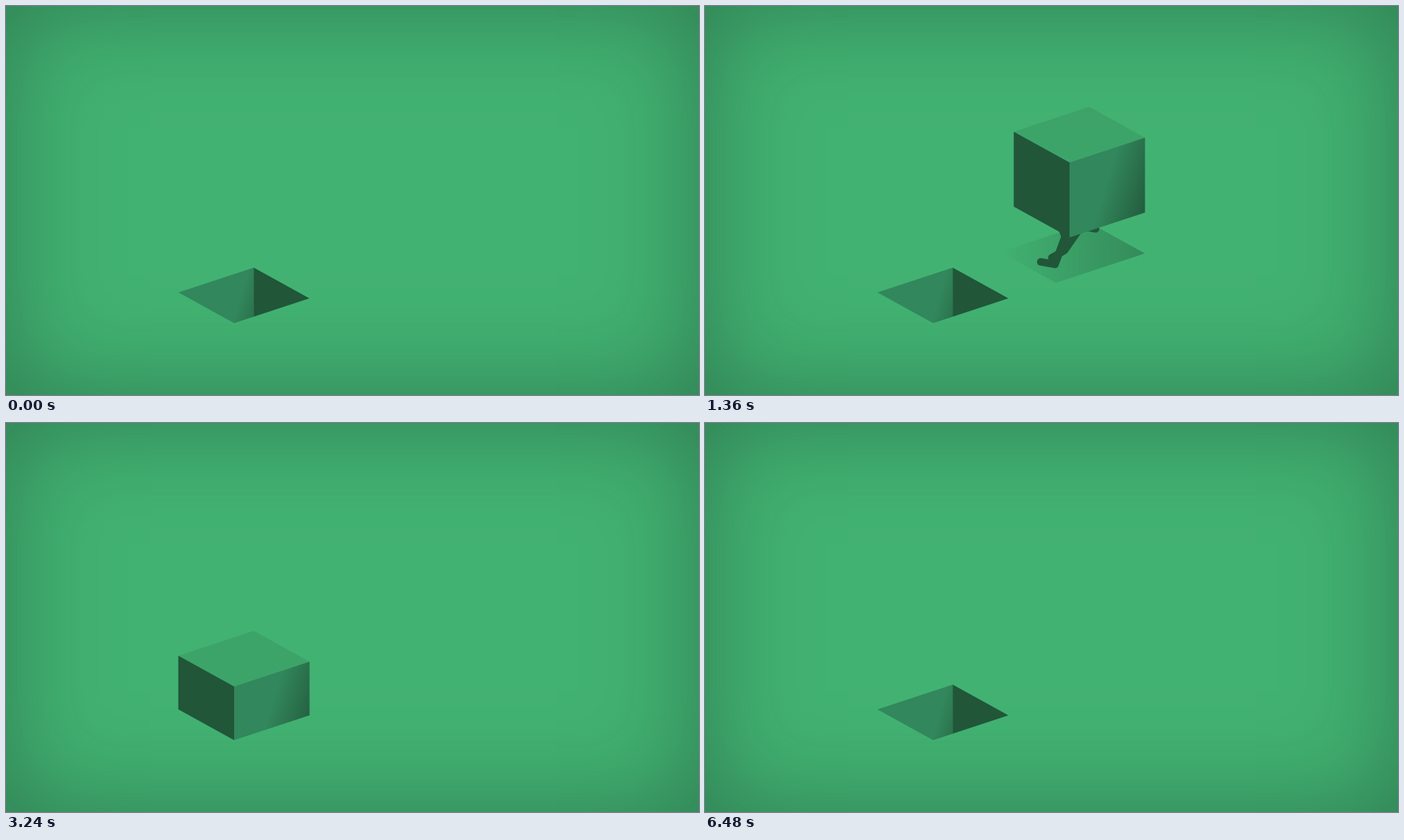
Animation, 960 px wide and 540 px high, one loop 6.92 s. Source, as an HTML page with a canvas:

```html
<!DOCTYPE html>
<html lang="en">
<head>
<meta charset="utf-8">
<title>Cube and hole</title>
<style>
html, body { margin: 0; width: 100%; height: 100%; overflow: hidden; }
body { background: rgb(66,178,114); box-shadow: inset 0 0 140px rgba(33,86,57,.56); }
canvas { display: block; }
</style>
</head>
<body>
<canvas id="stage" width="960" height="540"></canvas>
<script>
const ctx = document.getElementById('stage').getContext('2d');
const LOOP = 6920, SIZE = 104, SLOPE = .33;
const FALL = 2280, LAND = 2600, SINK = 2680, SHUT = 4840, OPEN = 5840, OPENED = 6480;
const DARK = 'rgb(33,86,57)', MID = 'rgb(50,135,92)';
const tint = a => `rgba(33,86,57,${a})`;

// Footprint corners, relative to the front one
const FRONT = [0, 0], LEFT = [-77.3, -42.8], RIGHT = [104.5, -34.5], BACK = [27.2, -77.3];
const HOLE = { x: 316, y: 440.3 };

// Way of the cube: [time, x]
const PATH = [[0, 1081], [1360, 505], [1960, 360.5], [FALL, 338], [2480, HOLE.x]];

// Left and right leg: hip, and crouching angles of thigh, shin and foot in degrees from straight down
const STRIDE = 528, BONES = [20, 41, 20];
const LEGS = [
  { hip: [-13, -20], crouch: [20, -20, -100], swing: 1 },
  { hip: [36, -12], crouch: [-100, -35, -60], swing: -1 }
];

const ramp = (t, a, b) => Math.min(1, Math.max(0, (t - a) / (b - a)));
const smooth = u => u * u * (3 - 2 * u);
const wave = (t, period) => t / period * 2 * Math.PI;
const down = ([x, y], d) => [x, y + d];

const crouching = t => ramp(t, 1200, 1360);
const leaping = t => smooth(ramp(t, 1560, 2025));

function cubeX(t) {
  const i = PATH.findIndex(key => key[0] > t);
  if (i < 0) return HOLE.x;
  const [[t0, x0], [t1, x1]] = [PATH[i - 1], PATH[i]];
  return x0 + (x1 - x0) * ramp(t, t0, t1);
}

// Height above ground: bouncing walk, crouch, leap, hang and drop
function cubeLift(t) {
  const squat = smooth(ramp(t, 1200, 1490));
  const bounce = 4 * Math.cos(wave(t - 800, STRIDE / 2)) * (1 - squat);
  return 75 + bounce - 34 * squat + 188 * leaping(t) - 229 * ramp(t, FALL, LAND) ** 2;
}

// Part of the cube still above ground while it sinks
function heightLeft(t) {
  const u = ramp(t, SINK, SHUT), v = 1 - u;
  return SIZE * (1 - smooth(u)) - 90 * u * v * v + 12 * u * u * v;
}

function trace(points) {
  ctx.beginPath();
  points.forEach(p => ctx.lineTo(...p));
}

function poly(fill, ...points) {
  trace(points);
  ctx.closePath();
  ctx.fillStyle = fill;
  ctx.fill();
}

// Slanted gradient running from the lit to the dark green
function shade(from, to) {
  const g = ctx.createLinearGradient(from * .917, from * .275, to * .917, to * .275);
  g.addColorStop(0, MID);
  g.addColorStop(1, DARK);
  return g;
}

function at(x, y, paint) {
  ctx.save();
  ctx.translate(x, y);
  paint();
  ctx.restore();
}

function drawHole(depth) {
  at(HOLE.x, HOLE.y, () => {
    trace([FRONT, LEFT, BACK, RIGHT]);
    ctx.clip();
    at(...LEFT, () => {
      const crease = [BACK[0] - LEFT[0], BACK[1] - LEFT[1]];
      poly(shade(88, 151), [0, 0], crease, down(crease, depth), [0, depth]);
    });
    poly(DARK, BACK, RIGHT, down(RIGHT, depth), down(BACK, depth));
  });
}

// Fades as the cube rises and reaches forward while it crouches
function drawShadow(x, y, t) {
  const reach = 19 * crouching(t) * (1 - leaping(t));
  const ahead = ([px, py]) => [px - reach, py + reach * SLOPE];
  at(x, y, () => {
    const g = ctx.createLinearGradient(LEFT[0] - reach, 0, RIGHT[0], 0);
    g.addColorStop(0, tint(0));
    g.addColorStop(1, tint(.42 * (1 - ramp(cubeLift(t), 80, 235))));
    poly(g, ahead(FRONT), ahead(LEFT), BACK, RIGHT);
  });
}

function drawLeg({ hip, crouch, swing }, t) {
  const phase = wave(t - 640, STRIDE), c = swing * Math.cos(phase), s = swing * Math.sin(phase);
  const bend = crouching(t) * (1 - leaping(t));
  const stride = [-22 - 20 * s, 47 + 28 * c, -30 + 45 * c];
  let [x, y] = hip;
  const joints = BONES.map((length, i) => {
    const angle = (stride[i] + (crouch[i] - stride[i]) * bend) * Math.PI / 180;
    return [x += length * Math.sin(angle), y += length * Math.cos(angle)];
  });
  trace([hip, ...joints]);
  ctx.strokeStyle = DARK;
  ctx.lineWidth = 10.5;
  ctx.lineCap = ctx.lineJoin = 'round';
  ctx.stroke();
}

// Hides whatever is below the front rim of the hole
function clipToRim() {
  const [left, front, right] = [LEFT, FRONT, RIGHT].map(([x, y]) => [HOLE.x + x, HOLE.y + y]);
  trace([[0, 0], [960, 0], [960, right[1]], right, front, left, [0, left[1]]]);
  ctx.clip();
}

function drawCube(x, y, t, visible) {
  ctx.save();
  if (t > FALL) clipToRim();
  ctx.translate(x, y);
  if (t < LAND) LEGS.forEach(leg => drawLeg(leg, t));
  ctx.translate(0, -SIZE);
  poly(tint(.15 * Math.min(1, visible / 30)), FRONT, LEFT, BACK, RIGHT);
  poly(shade(60, 135), FRONT, RIGHT, down(RIGHT, SIZE), down(FRONT, SIZE));
  poly(DARK, FRONT, LEFT, down(LEFT, SIZE), down(FRONT, SIZE));
  ctx.restore();
}

// Poses are held for 80 ms, or 40 ms while the cube sinks
function hold(t) {
  const step = t >= SINK && t < OPEN ? 40 : 80;
  const shift = t >= 1640 && t < SINK ? 40 : 0;
  return Math.floor((t - shift) / step) * step + shift;
}

function draw(now) {
  const t = hold(now % LOOP);
  const x = cubeX(t), ground = HOLE.y - (x - HOLE.x) * SLOPE;
  ctx.clearRect(0, 0, 960, 540);
  if (t < LAND) {
    drawShadow(x, ground, t);
    drawHole(SIZE);
  }
  if (t < SHUT) {
    const visible = heightLeft(t);
    drawCube(x, ground - cubeLift(t) + SIZE - visible, t, visible);
  }
  if (t > OPEN) drawHole(80 * smooth(ramp(t, OPEN, OPENED)));
}

const start = performance.now();
function tick() {
  draw(performance.now() - start);
  requestAnimationFrame(tick);
}
tick();
</script>
</body>
</html>
```
